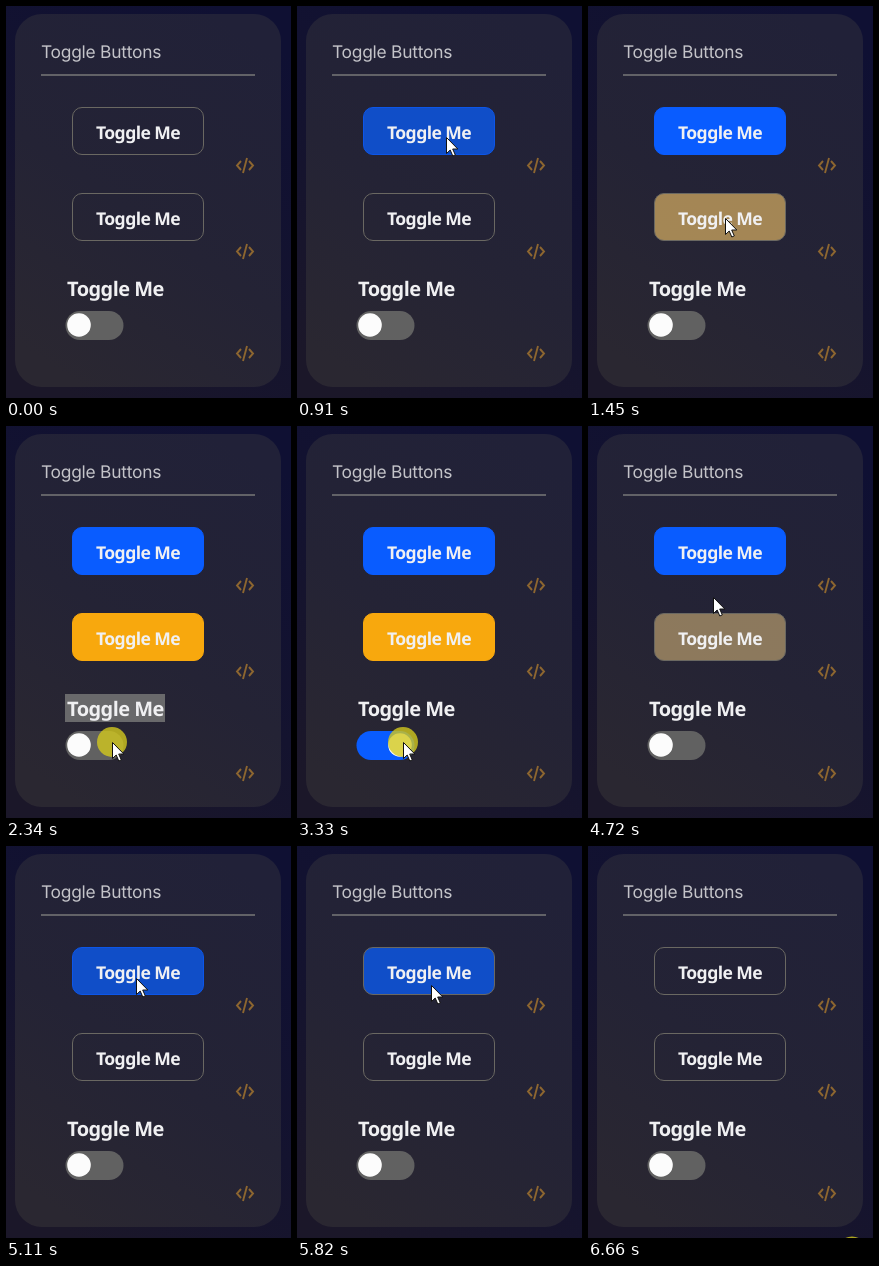
An HTML page that plays this animation: 285x392 px, repeating every 6730 ms.

```html
<!DOCTYPE html>
<html lang="en">
<head>
<meta charset="utf-8">
<title>Toggle Buttons</title>
<style>
html, body { margin: 0; width: 100%; height: 100%; overflow: hidden; background: #11112c; }
svg { display: block; width: 285px; height: 392px; }
text { font: 600 17.6px "Noto Sans", sans-serif; letter-spacing: -.6px; fill: #f0f0f2; text-rendering: geometricPrecision; }
.label { font-size: 20px; letter-spacing: -.55px; }
.title { font: 400 17.4px Inter, sans-serif; letter-spacing: -.25px; fill: #c4c4c9; }
.code { fill: none; stroke: #8d6630; stroke-width: 1.9; }
</style>
</head>
<body>
<svg viewBox="0 0 285 392">
  <defs>
    <linearGradient id="page" x1=".75" y1="0" x2=".25" y2="1">
      <stop offset="0" stop-color="#0f1033"/>
      <stop offset=".55" stop-color="#14132f"/>
      <stop offset="1" stop-color="#1b1729"/>
    </linearGradient>
    <linearGradient id="panel" x1=".75" y1="0" x2=".25" y2="1">
      <stop offset="0" stop-color="#212138"/>
      <stop offset=".55" stop-color="#242335"/>
      <stop offset="1" stop-color="#2a2731"/>
    </linearGradient>
    <path id="code" class="code" d="M-4 -4.5L-8 0L-4 4.5M4 -4.5L8 0L4 4.5M2 -7.5L-2 7.5"/>
  </defs>
  <rect width="285" height="392" fill="url(#page)"/>
  <rect x="9" y="8" width="266" height="373" rx="27" fill="url(#panel)"/>
  <text class="title" x="35" y="52">Toggle Buttons</text>
  <rect x="35" y="68" width="214" height="2" fill="#626267"/>
  <use href="#code" x="239" y="159.5"/>
  <use href="#code" x="239" y="245.5"/>
  <use href="#code" x="239" y="347.5"/>

  <rect id="b1" x="66.5" y="101.5" width="131" height="47" rx="9.5"/>
  <text x="132" y="133" text-anchor="middle">Toggle Me</text>
  <rect id="b2" x="66.5" y="187.5" width="131" height="47" rx="9.5"/>
  <text x="132" y="219" text-anchor="middle">Toggle Me</text>

  <rect id="sel" x="59" y="268" width="100" height="28" fill="#69696b"/>
  <text class="label" x="61" y="290">Toggle Me</text>
  <rect id="track" x="59.5" y="305" width="58" height="29" rx="14.5"/>
  <circle id="knob" cy="319" r="11.8" fill="#fcfcfc"/>

  <circle id="ring" r="15" fill="#d2c81e" fill-opacity=".8"/>
  <path id="cursor" d="M.5 .5V16.5L4.2 13L6.8 19L9.3 17.9L6.7 12H11.8Z" fill="#fff" stroke="#111"/>
</svg>
<script>
const LOOP = 6730, FADE = 260, PRESS = 90;
const $ = id => document.getElementById(id);
const ease = (t, start, dur) => {
  const u = Math.min(1, Math.max(0, (t - start) / dur));
  return u * u * (3 - 2 * u);
};
const mix = (a, b, u) => a.map((v, i) => v + (b[i] - v) * u);
const rgba = c => `rgba(${c})`;
const show = (id, on) => $(id).setAttribute('visibility', on ? 'visible' : 'hidden');

// The pointer glides from stop to stop and presses at each
const entry = [243, 356];
const stops = [
  { from: 100, to: 760, at: [149, 131], press: 820 },
  { from: 910, to: 1480, at: [137, 213], press: 1610 },
  { from: 1690, to: 2280, at: [106, 316], press: 2310 },
  { from: 3420, to: 4000, at: [120, 214], press: 4030 },
  { from: 4320, to: 4990, at: [130, 132], press: 5020 },
  { from: 5700, to: 6360, at: [264, 405.5], press: 6660 }
];
const toggleOff = 3330;
const presses = [...stops.map(s => s.press), toggleOff];

const pointer = t => stops.reduce(
  (p, s) => mix(p, s.at, ease(t, s.from, s.to - s.from) ** 1.5), entry);

const grey = [106, 104, 98, 1];
const clear = [255, 255, 255, 0];
const buttons = [
  { id: 'b1', lit: [9, 92, 255, 1], dim: [16, 78, 200, 1], enter: 640, on: 820, leave: 1110, back: 4830, off: 5110, exit: 5865 },
  { id: 'b2', lit: [248, 168, 13, 1], dim: [236, 160, 13, 1], enter: 1300, on: 1610, leave: 1910, back: 3800, off: 4120, exit: 4590 }
];

function drawButton(b, t) {
  const steps = [[b.dim, b.enter], [b.lit, b.leave], [b.dim, b.back], [clear, b.exit]];
  const fill = steps.reduce((c, [next, start]) => mix(c, next, ease(t, start, FADE)), clear);
  const tint = ease(t, b.on, PRESS) - ease(t, b.off, PRESS);
  $(b.id).setAttribute('fill', rgba(fill));
  $(b.id).setAttribute('stroke', rgba(mix(grey, mix(fill, b.lit, .6), tint)));
}

function draw(t) {
  buttons.forEach(b => drawButton(b, t));

  const on = ease(t, 2410, 360) - ease(t, toggleOff + PRESS, 360);
  $('knob').setAttribute('cx', 73 + 30 * on);
  $('track').setAttribute('fill', rgba(mix([97, 97, 97, 1], buttons[0].lit, on)));
  show('sel', t >= 2310 && t < toggleOff);

  const [x, y] = pointer(t);
  $('cursor').setAttribute('transform', `translate(${Math.round(x)} ${Math.round(y)})`);
  $('ring').setAttribute('cx', x);
  $('ring').setAttribute('cy', y);
  show('cursor', t >= 100);
  show('ring', presses.some(p => t >= p && t < p + PRESS));
}

const start = performance.now();
function tick() {
  draw((performance.now() - start) % LOOP);
  requestAnimationFrame(tick);
}
tick();
</script>
</body>
</html>
```
